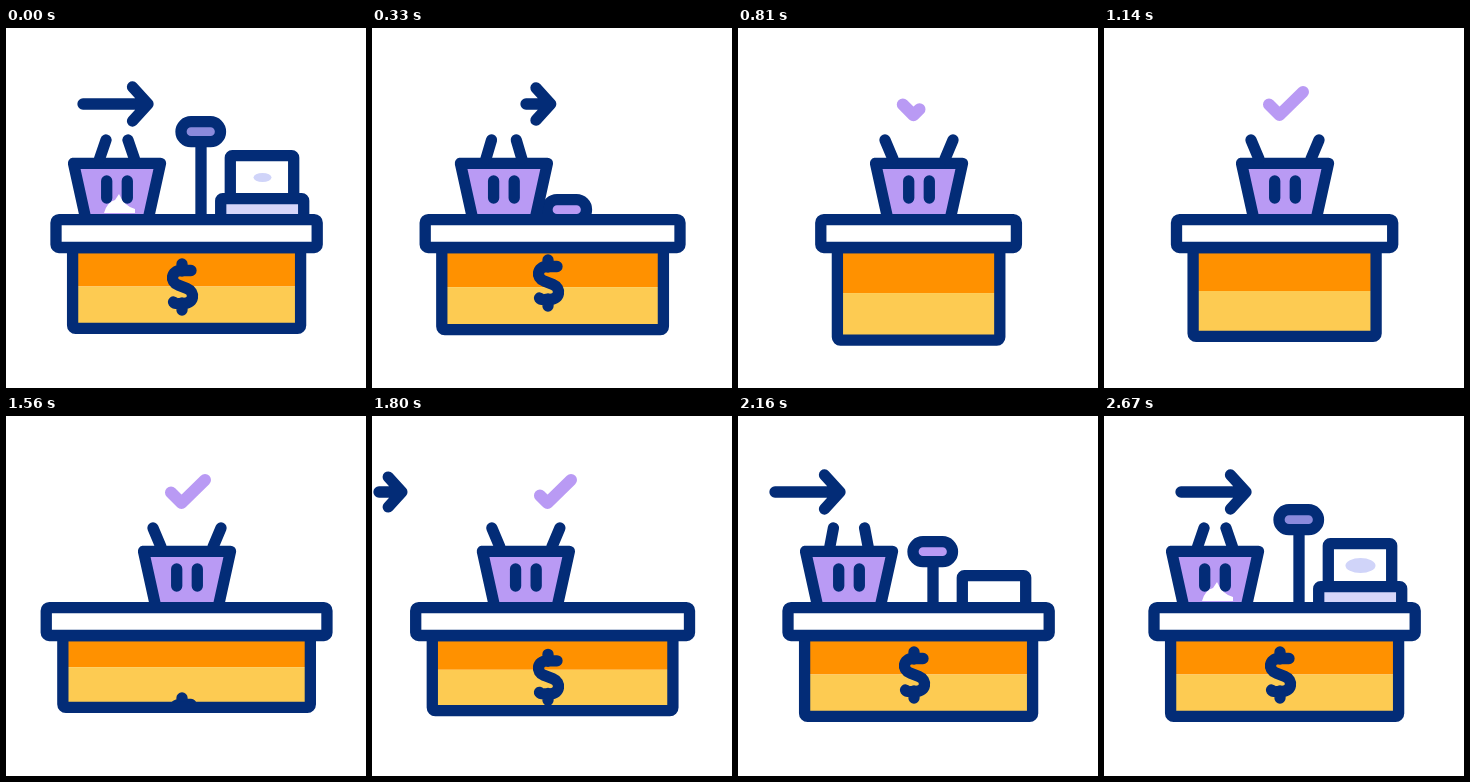
An HTML page that plays this animation: 360 px wide and 360 px high, repeating every 2.7 s.

```html
<!DOCTYPE html>
<html lang="en">
<head>
<meta charset="utf-8">
<title>Checkout counter</title>
<style>
html, body { margin: 0; width: 100%; height: 100%; overflow: hidden; background: #fff; }
svg { display: block; width: 100vw; height: 100vh; }
.ink { fill: none; stroke: #032c77; stroke-width: 11.3; stroke-linecap: round; stroke-linejoin: round; }
</style>
</head>
<body>
<svg viewBox="0 0 360 360">
  <defs>
    <clipPath id="aboveTop"><rect width="360" height="200"/></clipPath>
    <clipPath id="panelClip"><rect id="panelBox" y="220"/></clipPath>
  </defs>
  <path id="arrow" class="ink"/>
  <path id="check" fill="none" stroke="#b99af4" stroke-width="12" stroke-linecap="round" stroke-linejoin="round"/>
  <g clip-path="url(#aboveTop)">
    <g id="till">
      <path class="ink" d="M195 113V195"/>
      <rect id="scanner" class="ink" x="175" y="93.7" width="39.5" height="20" rx="10"/>
      <rect class="ink" x="224.3" y="127.7" width="63.4" height="50" rx="2" style="fill:#fff"/>
      <ellipse id="glow" cx="256.5" cy="149.5" fill="#d0d4f9"/>
      <rect class="ink" x="214.7" y="170.7" width="83" height="24" rx="2" style="fill:#d6d6fa"/>
    </g>
  </g>
  <g id="basket">
    <path class="ink" d="M-43.5 135.3H43.5L31 192H-31Z" style="fill:#b99af4"/>
    <path id="shine" d="M-13 185Q-10 174 -2 172L2 166Q7 178 18 181V185Z" fill="#fff"/>
    <path class="ink" d="M-10.3 153V170M10.3 153V170"/>
    <path id="handles" class="ink"/>
  </g>
  <g clip-path="url(#panelClip)">
    <rect id="orange" x="40" y="220" width="280" fill="#ff9100"/>
    <rect id="yellow" x="40" width="280" height="90" fill="#fdcb52"/>
    <path id="dollar" class="ink" d="M185 242.5H175C165 242.5 163.500 254 172 257L181 260.500C189.500 264 188 275.500 178 275.500H174Q169 276 167.500 274M176 236V243M176 275V282"/>
  </g>
  <rect id="panel" class="ink" y="219.5"/>
  <rect id="top" class="ink" y="191.7" height="27.8" rx="3" style="fill:#fff"/>
</svg>
<script>
const LOOP = 2700;
const $ = id => document.getElementById(id);
const mix = (a, b, k) => a + (b - a) * k;

function set(id, attrs) {
  const el = $(id);
  for (const name in attrs) el.setAttribute(name, attrs[name]);
}

// Smooth curve through [time, value] keys that never overshoots them.
function track(...keys) {
  const last = keys.length - 1;
  const rate = i => (keys[i + 1][1] - keys[i][1]) / (keys[i + 1][0] - keys[i][0]);
  const slope = i => {
    if (i === 0 || i === last) return 0;
    const a = rate(i - 1), b = rate(i);
    return a * b <= 0 ? 0 : 2 * a * b / (a + b);
  };
  return t => {
    if (t <= keys[0][0]) return keys[0][1];
    if (t >= keys[last][0]) return keys[last][1];
    const i = keys.findIndex(k => k[0] > t) - 1;
    const [t0, v0] = keys[i], [t1, v1] = keys[i + 1];
    const w = t1 - t0, u = (t - t0) / w, u2 = u * u, u3 = u2 * u;
    return v0 * (2 * u3 - 3 * u2 + 1) + v1 * (3 * u2 - 2 * u3)
      + w * (slope(i) * (u3 - 2 * u2 + u) + slope(i + 1) * (u3 - u2));
  };
}

const squeeze = track([150, 0], [540, 11.4], [860, 34], [1080, 28], [1140, 22.5], [1600, -10.2], [1980, -1.7], [2150, 0]);
const basketX = track([100, 0], [540, 50], [760, 70], [1620, 70], [1980, 8], [2120, 0]);
const spread = track([100, 0], [540, .2], [760, 1], [1900, 1], [1980, .95], [2160, .2], [2300, 0]);
const sink = track([60, 0], [480, 110], [1960, 110], [2160, 32], [2400, 0]);
const dollarOut = track([200, 0], [540, -21], [800, -70]);
const dollarIn = track([1450, 70], [1560, 46], [1850, 0]);
const arrowOut = track([60, 0], [500, 55]);
const arrowIn = track([1970, -70], [2160, -40], [2440, 0]);
const arrowErase = track([150, 0], [460, 1]);
const arrowDraw = track([1700, 0], [1950, 1]);
const checkDraw = track([700, 0], [920, 1]);
const checkErase = track([1740, 0], [1980, .81], [2050, 1]);
const checkSize = track([700, .8], [930, 1.25], [1110, 1]);
const glowSize = track([0, 9], [150, 0], [2300, 0], [2600, 15], [2670, 15], [2700, 9]);
const shineAlpha = track([0, 1], [120, 0], [2350, 0], [2550, 1], [2700, 1]);
const tint = track([0, 1], [300, 0], [2160, 0], [2450, 1]);

function drawCounter(t) {
  const d = squeeze(t), cx = 180.6;
  const topHalf = 130.6 - d, half = 114 - d;
  const bottom = 300.4 + d * (d > 0 ? .355 : .93);
  const split = 258.5 + d * (d > 0 ? .2 : .75);
  const box = { x: cx - half, width: 2 * half, height: bottom - 219.5 };
  set("top", { x: cx - topHalf, width: 2 * topHalf });
  set("panel", { ...box, rx: 3 });
  set("panelBox", box);
  set("orange", { height: split - 220 });
  set("yellow", { y: split });
  set("dollar", { transform: `translate(0 ${t < 1200 ? dollarOut(t) : dollarIn(t)})` });
}

function drawBasket(t) {
  const h = spread(t), tip = mix(11, 34, h), foot = mix(17.500, 26, h);
  set("basket", { transform: `translate(${111 + basketX(t)} 0)` });
  set("handles", { d: `M${-tip} 112L${-foot} 131M${tip} 112L${foot} 131` });
  set("shine", { opacity: shineAlpha(t) });
}

function drawTill(t) {
  const y = sink(t), k = tint(t), g = glowSize(t);
  const rgb = [[185, 139], [154, 138], [244, 220]].map(c => Math.round(mix(c[0], c[1], k)));
  set("till", { transform: `translate(0 ${y})` });
  $("scanner").style.fill = `rgb(${rgb})`;
  set("glow", { rx: g, ry: g * .5 });
}

function drawArrow(t) {
  const leaving = t < 1200;
  const shift = leaving ? arrowOut(t) : arrowIn(t);
  const part = leaving ? 1 - arrowErase(t) : arrowDraw(t);
  const from = shift + (leaving ? mix(142, 77, part) : 77);
  const to = shift + (leaving ? 142 : mix(77, 142, part));
  const s = Math.min(1, part * 2.5), hx = to - 15.5 * s, hy = 17 * s;
  set("arrow", {
    d: `M${from} 76H${to}M${hx} ${76 - hy}L${to} 76L${hx} ${76 + hy}`,
    visibility: part > .02 ? "visible" : "hidden"
  });
}

function drawCheck(t) {
  const a = checkErase(t), b = checkDraw(t), bend = .33;
  const at = k => k < bend
    ? [mix(165, 175.500, k / bend), mix(76.500, 87, k / bend)]
    : [mix(175.500, 199, (k - bend) / (1 - bend)), mix(87, 64, (k - bend) / (1 - bend))];
  const points = [at(a)];
  if (a < bend && b > bend) points.push(at(bend));
  points.push(at(b));
  set("check", {
    d: "M" + points.map(p => p.join(" ")).join("L"),
    transform: `translate(182 76) scale(${checkSize(t)}) translate(-182 -76)`,
    visibility: b - a > .01 ? "visible" : "hidden"
  });
}

function render(t) {
  drawCounter(t);
  drawBasket(t);
  drawTill(t);
  drawArrow(t);
  drawCheck(t);
}

let start;
function frame(now) {
  start ??= now;
  render((now - start) % LOOP);
  requestAnimationFrame(frame);
}
render(0);
requestAnimationFrame(frame);
</script>
</body>
</html>
```
